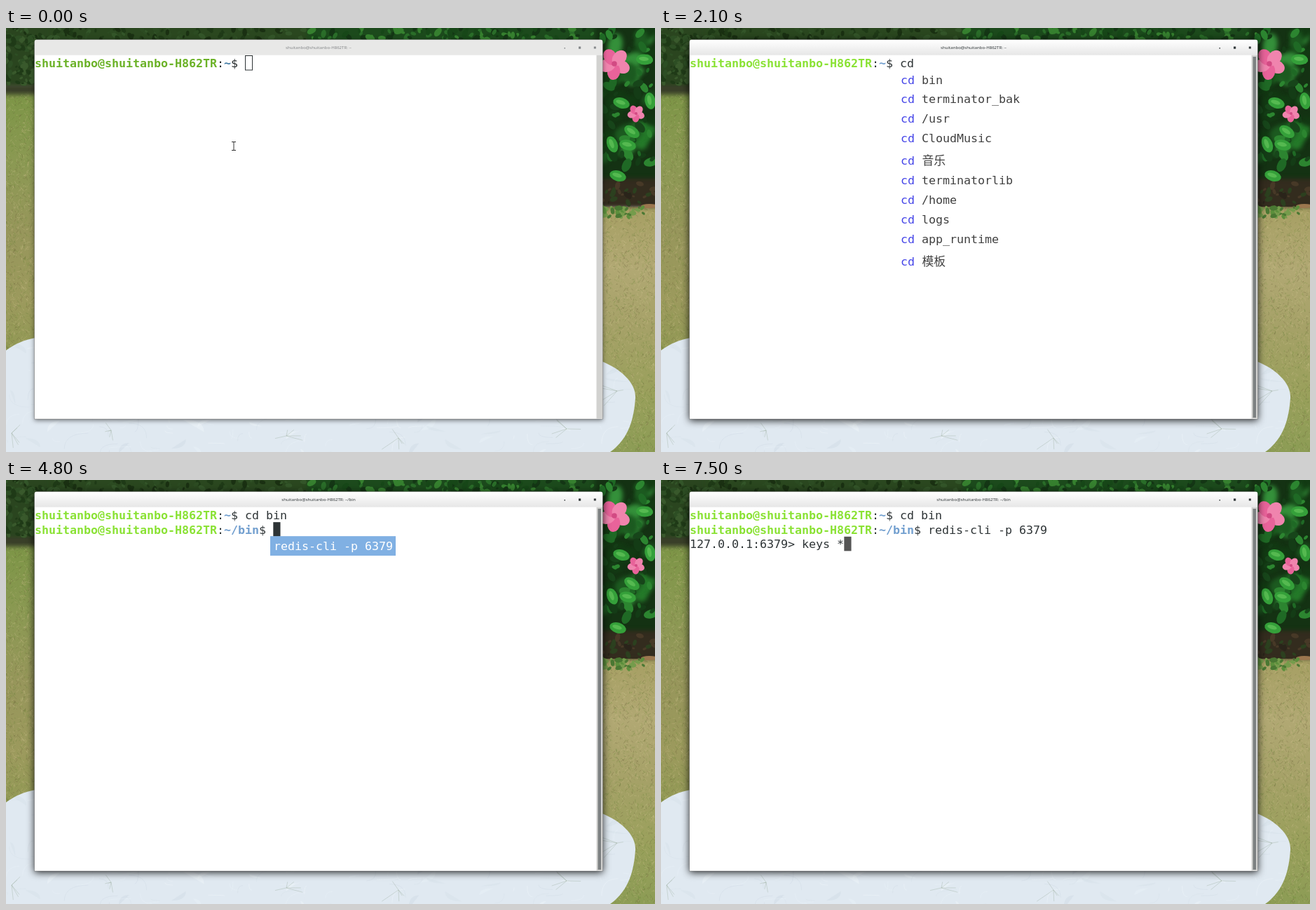
An HTML page with a canvas for the animation above (8 s loop, 926 px wide and 605 px high).

```html
<!DOCTYPE html>
<html lang="en">
<head>
<meta charset="utf-8">
<title>Terminal completion</title>
<style>
html, body { margin: 0; width: 100%; height: 100%; overflow: hidden; }
canvas { display: block; }
</style>
</head>
<body>
<canvas id="stage" width="926" height="605"></canvas>
<script>
const W = 926, H = 605, LOOP = 8000;
const CELL = 10, LINE = 20.65, LEFT = 41, TOP = 39.3;
const MONO = '16.61px "DejaVu Sans Mono", monospace';
const CJK = '16.8px "Noto Sans CJK SC", "Noto Sans CJK", sans-serif';
const HOST = 'shuitanbo@shuitanbo-H862TR';
const DIRS = ['bin', 'terminator_bak', '/usr', 'CloudMusic', '音乐',
  'terminatorlib', '/home', 'logs', 'app_runtime', '模板'].map(d => 'cd ' + d);
const ctx = document.getElementById('stage').getContext('2d');

// Each step changes part of the state; cursor is [column, row].
const bin = ['~', 'cd bin'], redis = ['~/bin', 'redis-cli -p 6379'];
const steps = [
  [0, { lines: [['~', '']], cursor: [30, 0], mouse: true, path: '~', focus: false, popup: null }],
  [300, { focus: true }],
  [900, { cursor: null }],
  [1300, { lines: [['~', 'c']], cursor: [31, 0], mouse: false, popup: { col: 30, row: 0, items: DIRS, typed: 1 } }],
  [1600, { lines: [['~', 'cd']], cursor: [32, 0], popup: { col: 30, row: 0, items: DIRS, typed: 2 } }],
  [2100, { cursor: null }],
  [3800, { popup: { col: 30, row: 0, items: DIRS, typed: 2, selected: true } }],
  [3900, { cursor: [32, 0] }],
  [4300, { popup: null }],
  [4400, { lines: [bin], cursor: [36, 0] }],
  [4800, { lines: [bin, ['~/bin', '']], cursor: [34, 1], path: '~/bin',
    popup: { col: 34, row: 1, items: [redis[1]], typed: 0, selected: true, width: 179 } }],
  [5300, { cursor: null }],
  [5800, { lines: [bin, redis], popup: null }],
  [6100, { cursor: [51, 1] }],
  [6300, { lines: [bin, redis, [null, '127.0.0.1:6379> ']], cursor: [16, 2] }],
  [6400, { popup: { col: 16, row: 2, items: ['keys *'], typed: 0, selected: true, width: 159 } }],
  [6800, { cursor: null }],
  [7500, { lines: [bin, redis, [null, '127.0.0.1:6379> keys *']], cursor: [22, 2], popup: null, cursorColor: '#555' }],
];

function seeded(seed) {
  return () => {
    seed = (seed * 1664525 + 1013904223) >>> 0;
    return seed / 4294967296;
  };
}

function paintGarden() {
  const canvas = document.createElement('canvas');
  canvas.width = W;
  canvas.height = H;
  const g = canvas.getContext('2d'), rnd = seeded(7);
  const pick = list => list[Math.floor(rnd() * list.length)];
  const rect = (color, x, y, w, h) => { g.fillStyle = color; g.fillRect(x, y, w, h); };

  function ellipse(color, x, y, rx, ry, angle = 0) {
    g.fillStyle = color;
    g.beginPath();
    g.ellipse(x, y, rx, ry, angle, 0, 7);
    g.fill();
  }
  function leaves(count, x, y, w, h, size, colors) {
    for (let i = 0; i < count; i++) {
      const r = size * (0.5 + rnd());
      ellipse(pick(colors), x + rnd() * w, y + rnd() * h, r, r * 0.6, rnd() * 3);
    }
  }
  function grass(x, y, w, h, colors) {
    const shade = g.createLinearGradient(0, y, 0, y + h);
    colors.forEach((color, i) => shade.addColorStop(i / (colors.length - 1), color));
    rect(shade, x, y, w, h);
    g.globalAlpha = 0.3;
    for (let i = 0; i < w * h / 14; i++) {
      const px = x + rnd() * w, py = y + rnd() * h;
      g.strokeStyle = pick(['#d2c792', '#5f7a33', '#c9bb88', '#7d9444', '#665f36']);
      g.beginPath();
      g.moveTo(px, py);
      g.lineTo(px + rnd() * 8 - 4, py - rnd() * 5);
      g.stroke();
    }
    g.globalAlpha = 1;
  }
  function flower(x, y, r) {
    for (let i = 0; i < 5; i++) {
      const a = i * 1.257 + 0.4;
      ellipse(i % 2 ? '#e8639a' : '#f084ae', x + Math.cos(a) * r * 0.5, y + Math.sin(a) * r * 0.5, r * 0.55, r * 0.42, a);
    }
    ellipse('#d24a83', x, y, r * 0.17, r * 0.17);
  }

  grass(0, 90, 60, 400, ['#7c9546', '#8b9953', '#97965b', '#9c9a5d', '#8d9851']);
  grass(840, 255, 86, 350, ['#a69f63', '#b1a873', '#a5a167', '#9aa05c', '#8c9c55']);

  g.filter = 'blur(3px)';
  rect('#2a471f', -9, -9, 460, 29);
  rect('#1c4a1c', 430, -9, 505, 29);
  rect('#2a451f', -9, -9, 70, 92);
  rect('#3a4029', -9, 82, 70, 13);
  rect('#143213', 840, -9, 95, 228);
  rect('#332c1e', 840, 215, 95, 40);
  leaves(35, 846, 0, 80, 190, 14, ['#1c5a20', '#257a2a', '#123a13', '#34903a']);
  g.filter = 'none';

  leaves(130, 0, 0, 430, 18, 4, ['#1f3a17', '#335529', '#1a3012', '#2c4b22']);
  leaves(90, 0, 10, 44, 70, 4, ['#1f3a17', '#39592c', '#2d4e24']);
  leaves(110, 430, 0, 420, 18, 5, ['#174718', '#2a6d29', '#143615', '#36802f']);
  leaves(55, 848, 0, 78, 200, 7, ['#17451a', '#1f6925', '#2c8530', '#143c16']);
  for (const [x, y, angle] of [[911, 45, 0.1], [878, 107, 0.3], [919, 104, 1.4], [865, 166, 1.2], [887, 167, 0.2], [893, 148, 0.6], [873, 211, 0.3]]) {
    ellipse('#35a03a', x, y, 12, 7.5, angle);
    ellipse('#55b950', x - 1, y - 1, 7, 3, angle);
  }
  leaves(30, 846, 218, 80, 32, 4, ['#2a241a', '#473927', '#2c401f']);
  ellipse('#9c774f', 918, 254, 12, 3);
  leaves(40, 846, 256, 64, 14, 4, ['#5c8f3c', '#759c4c', '#4a7833']);
  flower(868, 51, 22);
  flower(899, 122, 12);

  g.beginPath();
  g.moveTo(0, 460);
  g.bezierCurveTo(15, 449, 28, 445, 42, 442);
  g.lineTo(851, 476);
  g.bezierCurveTo(875, 486, 899, 505, 898, 528);
  g.bezierCurveTo(896, 555, 890, 585, 862, H);
  g.lineTo(0, H);
  g.clip();
  rect('#e0e9f1', 0, 440, W, 165);
  for (let i = 0; i < 260; i++) {
    const x = rnd() * 900, y = 445 + rnd() * 160, dx = rnd() * 70 - 35, dy = rnd() * 50 - 25;
    g.globalAlpha = 0.35;
    g.strokeStyle = g.fillStyle = pick(['#f4f8fc', '#ecf2f8', '#c8d5df', '#d0dce5']);
    g.beginPath();
    g.moveTo(x, y);
    g.quadraticCurveTo(x + dx, y, x + dx, y + dy);
    i % 3 ? g.stroke() : g.fill();
  }
  g.globalAlpha = 0.3;
  g.strokeStyle = '#8b9e8c';
  for (const [x, y] of [[8, 578], [150, 574], [400, 582], [560, 585], [800, 572], [872, 518]]) {
    for (let i = 0; i < 5; i++) {
      g.beginPath();
      g.moveTo(x, y);
      g.lineTo(x + rnd() * 50 - 25, y + rnd() * 36 - 14);
      g.stroke();
    }
  }
  return canvas;
}

function fill(color, x, y, w, h) {
  ctx.fillStyle = color;
  ctx.fillRect(x, y, w, h);
}

function text(str, x, y, color, font = MONO) {
  ctx.font = font;
  ctx.fillStyle = color;
  ctx.fillText(str, x, y);
}

function drawWindow({ focus, path }, glow) {
  ctx.save();
  ctx.shadowColor = `rgba(0,0,0,${0.5 + 0.35 * glow})`;
  ctx.shadowBlur = 6 + 5 * glow;
  ctx.shadowOffsetY = 2;
  ctx.fillStyle = '#fff';
  ctx.beginPath();
  ctx.roundRect(40.5, 16.5, 811, 541.5, [4, 4, 0, 0]);
  ctx.fill();
  ctx.restore();
  ctx.strokeStyle = 'rgba(0,0,0,0.25)';
  ctx.lineWidth = 1;
  ctx.stroke();

  ctx.save();
  ctx.clip();
  const bar = ctx.createLinearGradient(0, 17, 0, 39);
  bar.addColorStop(0, focus ? '#fff' : '#e8e8e7');
  bar.addColorStop(1, focus ? '#e6e6e6' : '#e8e8e7');
  fill(bar, 41, 17, 810, 21.7);
  fill('#d2d2d0', 842.5, 38.7, 8.5, 519);
  ctx.globalAlpha = glow;
  fill('#7d8182', 844.5, 41, 4.5, 515);
  ctx.restore();

  const ink = focus ? '#33393b' : '#85888a';
  ctx.textAlign = 'center';
  text(`${HOST}: ${path}`, 446, 30, ink, '6.1px "Noto Sans", sans-serif');
  ctx.textAlign = 'left';
  fill(ink, 796.5, 28, 1.5, 1.5);
  fill(ink, 817, 26.5, 3.2, 3.2);
  fill(ink, 838.8, 26.5, 3, 3);
}

function drawLines({ lines, focus }) {
  const ink = focus ? '#2e3436' : '#252a2b';
  lines.forEach(([path, command], row) => {
    let x = LEFT;
    const y = 56 + row * LINE;
    const put = (str, color, bold) => {
      text(str, x, y, color, (bold ? 'bold ' : '') + MONO);
      x += str.length * CELL;
    };
    if (path) {
      put(HOST, focus ? '#8ae234' : '#6bb227', true);
      put(':', ink);
      put(path, focus ? '#729fcf' : '#447ca5', true);
      put('$ ', ink);
    }
    put(command, ink);
  });
}

function drawCursor({ cursor, focus, cursorColor = '#2e3436' }) {
  if (!cursor) return;
  const x = LEFT + cursor[0] * CELL, y = TOP + cursor[1] * LINE;
  if (focus) return fill(cursorColor, x + 0.3, y + 0.2, 10.2, 20.5);
  ctx.strokeStyle = '#2e3436';
  ctx.lineWidth = 1;
  ctx.strokeRect(x + 0.5, 39.5, 10, 20.5);
}

function drawPopup({ popup }) {
  if (!popup) return;
  const { col, row, items, typed, selected, width = 179 } = popup;
  const x = LEFT + col * CELL - 4;
  let y = 59.5 + row * LINE;
  items.forEach((item, i) => {
    const wide = item.charCodeAt(3) > 255, active = selected && i === 0;
    const base = y + (wide ? 23.6 : 20), ink = active ? '#fff' : '#404040';
    if (active) fill('#80b0e3', x, y, width, 27.8);
    text(item.slice(0, typed), x + 5, base, '#4545e8');
    const rest = wide ? item.slice(typed, 3) : item.slice(typed);
    text(rest, x + 5 + typed * CELL, base, ink);
    if (wide) text(item.slice(3), x + 35.5, base, ink, CJK);
    y += wide ? 32.2 : 27.9;
  });
}

function drawMouse() {
  ctx.strokeStyle = '#333';
  ctx.lineWidth = 1;
  ctx.beginPath();
  for (const y of [162.5, 174.5]) {
    ctx.moveTo(322, y);
    ctx.lineTo(328, y);
  }
  ctx.moveTo(325, 162);
  ctx.lineTo(325, 175);
  ctx.stroke();
}

const garden = paintGarden();

function draw(now) {
  const t = now % LOOP;
  const state = Object.assign({}, ...steps.filter(([at]) => at <= t).map(([, change]) => change));
  const glow = t < 300 ? 0 : t < 500 ? 0.6 : t < 600 ? 0.9 : 1;
  ctx.drawImage(garden, 0, 0);
  drawWindow(state, glow);
  drawLines(state);
  drawCursor(state);
  drawPopup(state);
  if (state.mouse) drawMouse();
}

const start = performance.now();
function tick() {
  draw(performance.now() - start);
  requestAnimationFrame(tick);
}
tick();
</script>
</body>
</html>
```
